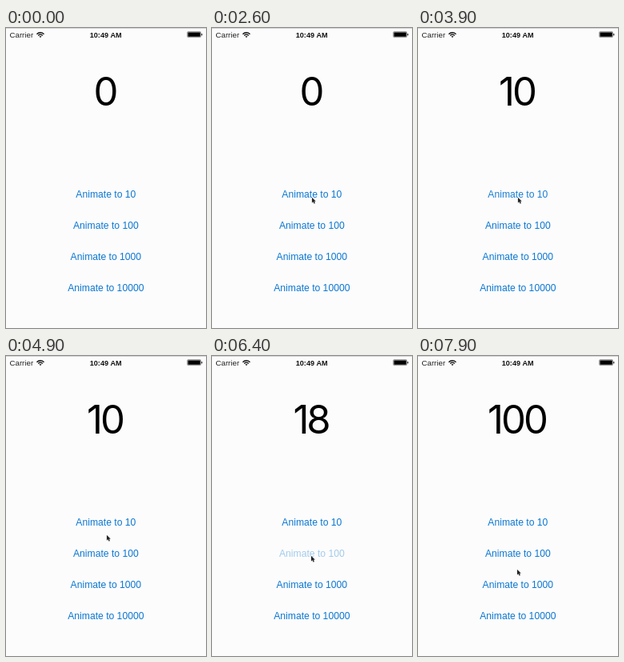
An HTML page with a canvas for the animation above (8000 ms loop, 250 by 375 pixels).

```html
<!DOCTYPE html>
<html lang="en">
<head>
<meta charset="utf-8">
<title>Counting label</title>
<style>
  html, body { margin: 0; width: 100%; height: 100%; overflow: hidden; background: #fcfcfc; }
  canvas { display: block; width: 250px; height: 375px; }
</style>
</head>
<body>
<canvas id="stage"></canvas>
<script>
const W = 250, H = 375, LOOP = 8000, STEP = 100;
const SANS = '"Liberation Sans", Arial, sans-serif';
const DIGITS = 'Inter, Roboto, sans-serif';
const BLUE = '#0b77d2';

const canvas = document.getElementById('stage');
const ctx = canvas.getContext('2d');
const ratio = window.devicePixelRatio || 1;
canvas.width = W * ratio;
canvas.height = H * ratio;

const buttons = [
  { goal: 10, y: 212, press: 2700, release: 3126 },
  { goal: 100, y: 251, press: 5500, release: 6129 },
  { goal: 1000, y: 290 },
  { goal: 10000, y: 329 }
];
const COUNT_TIME = 980, FADE_OUT = 350, FADE_IN = 920, DIM = 0.2;

// Pointer tip: time, x, y
const route = [
  [800, 236, 320], [1200, 165, 254], [1600, 123, 215], [1800, 123, 215],
  [2400, 123, 215], [2600, 125, 212], [4400, 125, 212], [4900, 126, 224],
  [5100, 125, 234], [5500, 124, 250], [7600, 124, 250], [7900, 124, 267]
];

const clamp = v => Math.min(1, Math.max(0, v));
const mix = (a, b, p) => a + (b - a) * p;
const smooth = p => p * p * (3 - 2 * p);
const cubic = p => p < 0.5 ? 4 * p ** 3 : 1 - (2 - 2 * p) ** 3 / 2;

function text(str, x, y, font, color, align = 'center', spacing = 0) {
  ctx.font = font;
  ctx.fillStyle = color;
  ctx.textAlign = align;
  ctx.letterSpacing = spacing + 'px';
  ctx.fillText(str, x, y);
}

function counterAt(t) {
  let value = 0;
  for (const b of buttons) {
    if (b.release) value = mix(value, b.goal, cubic(clamp((t - b.release) / COUNT_TIME)));
  }
  return Math.round(value);
}

function alphaAt(b, t) {
  if (!b.press || t < b.press) return 1;
  if (t < b.release) return mix(1, DIM, clamp((t - b.press) / FADE_OUT));
  return mix(DIM, 1, smooth(clamp((t - b.release) / FADE_IN)));
}

function pointerAt(t) {
  if (t < route[0][0]) return null;
  const i = route.findIndex(p => p[0] > t);
  if (i < 0) return route[route.length - 1].slice(1);
  const [t0, x0, y0] = route[i - 1], [t1, x1, y1] = route[i];
  const p = (t - t0) / (t1 - t0);
  return [mix(x0, x1, p), mix(y0, y1, p)];
}

function drawWifi(x, y) {
  ctx.strokeStyle = ctx.fillStyle = '#111';
  ctx.lineWidth = 1.4;
  for (const r of [3.7, 6.2]) {
    ctx.beginPath();
    ctx.arc(x, y, r, -Math.PI * 0.76, -Math.PI * 0.24);
    ctx.stroke();
  }
  ctx.beginPath();
  ctx.moveTo(x, y);
  ctx.arc(x, y, 2, -Math.PI * 0.76, -Math.PI * 0.24);
  ctx.fill();
}

function drawBattery() {
  ctx.strokeStyle = '#555';
  ctx.lineWidth = 0.6;
  ctx.beginPath();
  ctx.roundRect(226.6, 4.6, 17, 7, 1.2);
  ctx.stroke();
  ctx.fillStyle = '#000';
  ctx.fillRect(227.4, 5.4, 15.4, 5.4);
  ctx.fillRect(244.3, 7, 1, 2.4);
}

function drawPointer([x, y]) {
  const shape = [[0, 0], [0, 6.4], [1.5, 5.1], [2.6, 7.6], [3.8, 7.1], [2.8, 4.7], [4.6, 4.6]];
  ctx.beginPath();
  shape.forEach(([dx, dy]) => ctx.lineTo(x + dx, y + dy));
  ctx.closePath();
  ctx.lineWidth = 0.8;
  ctx.strokeStyle = '#ccc';
  ctx.stroke();
  ctx.fillStyle = '#222';
  ctx.fill();
}

function draw(t) {
  ctx.setTransform(ratio, 0, 0, ratio, 0, 0);
  ctx.fillStyle = '#fcfcfc';
  ctx.fillRect(0, 0, W, H);
  ctx.fillStyle = '#c4c4c4';
  ctx.fillRect(0, 0, W, 0.7);

  text('Carrier', 4.5, 12, '9.7px ' + SANS, '#222', 'left');
  drawWifi(43, 12);
  text('10:49 AM', 124.7, 12, 'bold 9.1px ' + SANS, '#111');
  drawBattery();

  text(String(counterAt(t)), 123.5, 97, '400 49px ' + DIGITS, '#000', 'center', -3);

  for (const b of buttons) {
    ctx.globalAlpha = alphaAt(b, t);
    text('Animate to ' + b.goal, 124.8, b.y, '12.15px ' + SANS, BLUE);
  }
  ctx.globalAlpha = 1;

  const tip = pointerAt(t);
  if (tip) drawPointer(tip);
}

const start = performance.now();
function tick() {
  const t = (performance.now() - start) % LOOP;
  draw(Math.floor(t / STEP) * STEP);
  requestAnimationFrame(tick);
}
tick();
</script>
</body>
</html>
```
